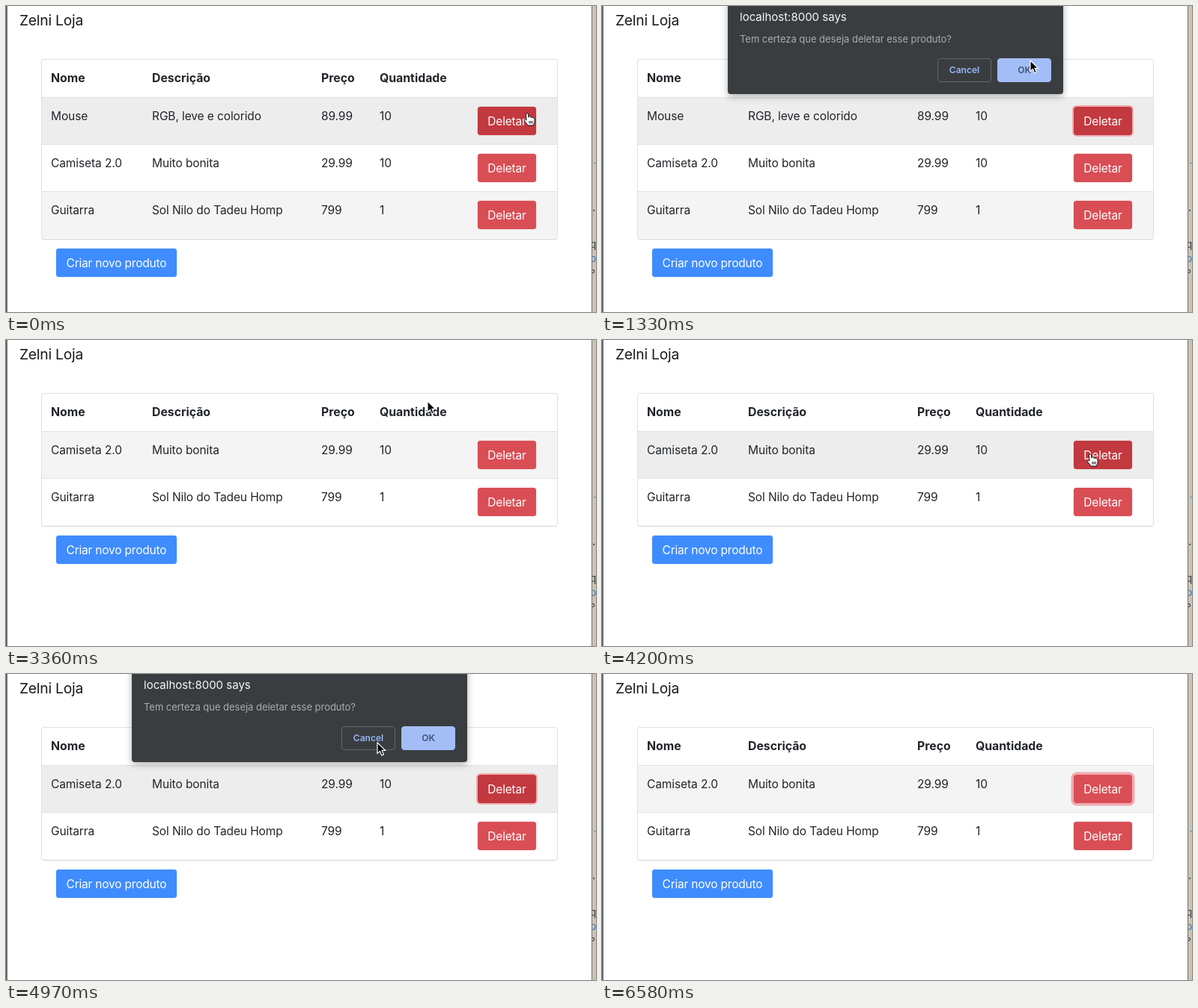
Write an HTML page that moves like this. It is 788 px wide and 410 px high and loops after 6650 ms.

```html
<!DOCTYPE html>
<html lang="pt">
<head>
<meta charset="utf-8">
<title>Loja</title>
<style>
html, body { margin: 0; width: 100%; height: 100%; overflow: hidden; background: #fff; }
#stage { position: relative; width: 788px; height: 410px; overflow: hidden; background: #fff;
  font: 15.5px/24px Inter, Roboto, sans-serif; letter-spacing: -.1px; color: #212529; }
#stage * { position: absolute; box-sizing: border-box; white-space: nowrap; }
#brand { left: 18px; top: 7px; font-size: 19.2px; letter-spacing: -.2px; color: #16181a; }
#card { left: 47px; top: 71px; width: 690px; border: 1px solid #dfdfdf; border-bottom-color: #d2d3d4;
  border-radius: 4px; overflow: hidden; }
#head { font-weight: 700; font-size: 15.8px; letter-spacing: 0; top: 0; height: 50px; width: 100%; }
#head span { top: 13px; }
.row { left: 0; width: 100%; height: 63px; border-top: 1px solid #e0e2e4; }
.row span { top: 13px; }
.btn { height: 38px; line-height: 39.5px; border-radius: 4px; color: #fff; text-align: center; letter-spacing: -.2px; }
.delete { left: 582px; top: 12px; width: 78px; }
#create { left: 67px; width: 161px; background: #3f8cff; box-shadow: 0 0 1px #3f8cff; }
#leftEdge { left: 0; top: 0; width: 2px; height: 410px; background: linear-gradient(90deg, #4b4b4d, #8f8f91); }
#rightEdge { left: 782px; top: 0; width: 6px; height: 410px; overflow: hidden; background: #cdc3b4;
  border-left: 1px solid #77716a; font: 14px/18px "DejaVu Sans Mono", monospace; }
#dialog { left: 168px; top: -40px; width: 448px; height: 158px; background: #3a3d40; border-radius: 4px;
  box-shadow: 0 3px 10px rgba(0, 0, 0, .32); transform-origin: 50% 100%; letter-spacing: 0; }
#dialog b { left: 16px; top: 43px; font-size: 15px; font-weight: 400; color: #f6f7f8; }
#dialog p { left: 16px; top: 72px; margin: 0; font-size: 12.95px; color: #a9adb1; }
#dialog i { top: 110px; width: 72px; height: 32px; line-height: 30px; border: 1px solid #63676b; border-radius: 4px;
  font-style: normal; font-weight: 600; font-size: 12px; text-align: center; color: #96b7f6; }
#dialog i:last-child { left: 360px; background: #a3bdf7; border-color: #a3bdf7; color: #40506f; }
#pointer { left: 0; top: 0; width: 20px; height: 24px; overflow: visible; }
</style>
</head>
<body>
<div id="stage">
  <div id="brand">Zelni Loja</div>
  <div id="card"><div id="head"></div></div>
  <div id="create" class="btn">Criar novo produto</div>
  <div id="leftEdge"></div>
  <div id="rightEdge">
    <span style="top:201px;color:#3d9c8c">-</span>
    <span style="top:261px;left:-2px;color:#444">.</span>
    <span style="top:310px;left:-3px;color:#444">qu</span>
    <span style="top:329px;left:-3px;color:#3978b8">po</span>
    <span style="top:349px;left:-3px;font-size:11px;color:#333">P</span>
  </div>
  <div id="dialog">
    <b>localhost:8000 says</b>
    <p>Tem certeza que deseja deletar esse produto?</p>
    <i style="left:280px">Cancel</i><i>OK</i>
  </div>
  <svg id="pointer">
    <path id="arrow" d="M0 0V14.5L3.4 11.4L5.8 17L8.4 15.9L6 10.4H10.6Z" fill="#000" stroke="#fff" stroke-width="1.2"/>
    <path id="hand" d="M-1.5 1.2C-1.5-.7 1.4-.7 1.6 1L2 5.2C3-.1 5 4.6 5 5.6C6 4.2 7.6 4.8 7.8 6.2
      C9 5.2 10.2 6 10 7.6V11.5L8.4 16H1.2L-3.8 9.8C-4.6 8 -2.4 7.4 -1 9.2Z M3 10V13.5M5 10V13.5M7 10V13.5"
      fill="#fff" stroke="#111" stroke-width="1"/>
  </svg>
</div>
<script>
const LOOP = 6650, STEP = 70, RELOAD = 2800;
const columns = [12, 147, 373, 451];
const products = [
  ['Mouse', 'RGB, leve e colorido', '89.99', '10'],
  ['Camiseta 2.0', 'Muito bonita', '29.99', '10'],
  ['Guitarra', 'Sol Nilo do Tadeu Homp', '799', '1']
];
// Pointer tip: time, x, y
const path = [
  [0, 696, 144], [350, 690, 148], [770, 690, 148], [1330, 572, 73], [2100, 568, 77], [2240, 562, 80],
  [3010, 562, 80], [3290, 563, 82], [3430, 563, 82], [3850, 652, 153], [4550, 652, 153],
  [4970, 496, 92], [5250, 496, 92], [5600, 520, -26], [LOOP, 520, -26]
];

const $ = id => document.getElementById(id);
const clamp = v => Math.max(0, Math.min(1, v));
const ramp = (t, start, length = 200) => clamp((t - start) / length);
const within = (t, from, to) => t >= from && t < to;

function fillCells(parent, texts) {
  texts.forEach((text, i) => {
    const cell = document.createElement('span');
    cell.textContent = text;
    cell.style.left = columns[i] + 'px';
    parent.append(cell);
  });
}

fillCells($('head'), ['Nome', 'Descrição', 'Preço', 'Quantidade']);
const rows = products.map(product => {
  const row = document.createElement('div');
  const button = document.createElement('div');
  row.className = 'row';
  button.className = 'btn delete';
  button.textContent = 'Deletar';
  fillCells(row, product);
  row.append(button);
  $('card').append(row);
  return { row, button };
});

function pointerAt(t) {
  const i = path.findIndex(point => point[0] > t);
  const [t0, x0, y0] = path[i - 1], [t1, x1, y1] = path[i];
  const u = (t - t0) / (t1 - t0), ease = u * u * (3 - 2 * u);
  return [x0 + (x1 - x0) * ease, y0 + (y1 - y0) * ease];
}

function drawTable(t) {
  const removed = t >= RELOAD ? 1 : 0;
  const count = 3 - removed;
  const rowHover = t < RELOAD || within(t, 3640, 5400);
  const buttonHover = t < RELOAD || within(t, 3710, 5400);
  const ring = t < RELOAD ? 2 * ramp(t, 400, 150)
    : 2 * ramp(t, 4410, 150) + 1.5 * ramp(t, 5320, 150);

  rows.forEach(({ row, button }, i) => {
    const place = i - removed, first = place === 0;
    const color = first && buttonHover ? '#c2393f' : '#d94e55';
    row.style.display = place < 0 ? 'none' : '';
    row.style.top = 50 + 63 * place + 'px';
    row.style.background = first && rowHover ? '#ededed' : place % 2 ? '#fff' : '#f4f4f4';
    button.style.background = color;
    button.style.boxShadow = first && ring ? `0 0 0 ${ring}px #f0abb0` : `0 0 1px ${color}`;
  });
  $('card').style.height = 53 + 63 * count + 'px';
  $('create').style.top = 136 + 63 * count + 'px';
}

function drawDialog(t) {
  const shown = t < 3500 ? ramp(t, 408) - ramp(t, 2450) : ramp(t, 4228) - ramp(t, 5118);
  const tilt = (1 - shown) / .66;
  const dialog = $('dialog');
  dialog.style.opacity = shown;
  dialog.style.transform = `translateY(${-14 * tilt}px)
    matrix3d(1,0,0,0, 0,${1 + .035 * tilt},0,${-.0004 * tilt}, 0,0,1,0, 0,0,0,1)`;
}

function drawPointer(t) {
  const [x, y] = pointerAt(t);
  const isHand = t < 420 || within(t, 3710, 4270);
  $('pointer').style.transform = `translate(${x}px, ${y}px)`;
  $('hand').style.display = isHand ? '' : 'none';
  $('arrow').style.display = isHand ? 'none' : '';
}

function frame() {
  const t = Math.floor(performance.now() % LOOP / STEP) * STEP;
  drawTable(t);
  drawDialog(t);
  drawPointer(t);
  requestAnimationFrame(frame);
}
frame();
</script>
</body>
</html>
```
